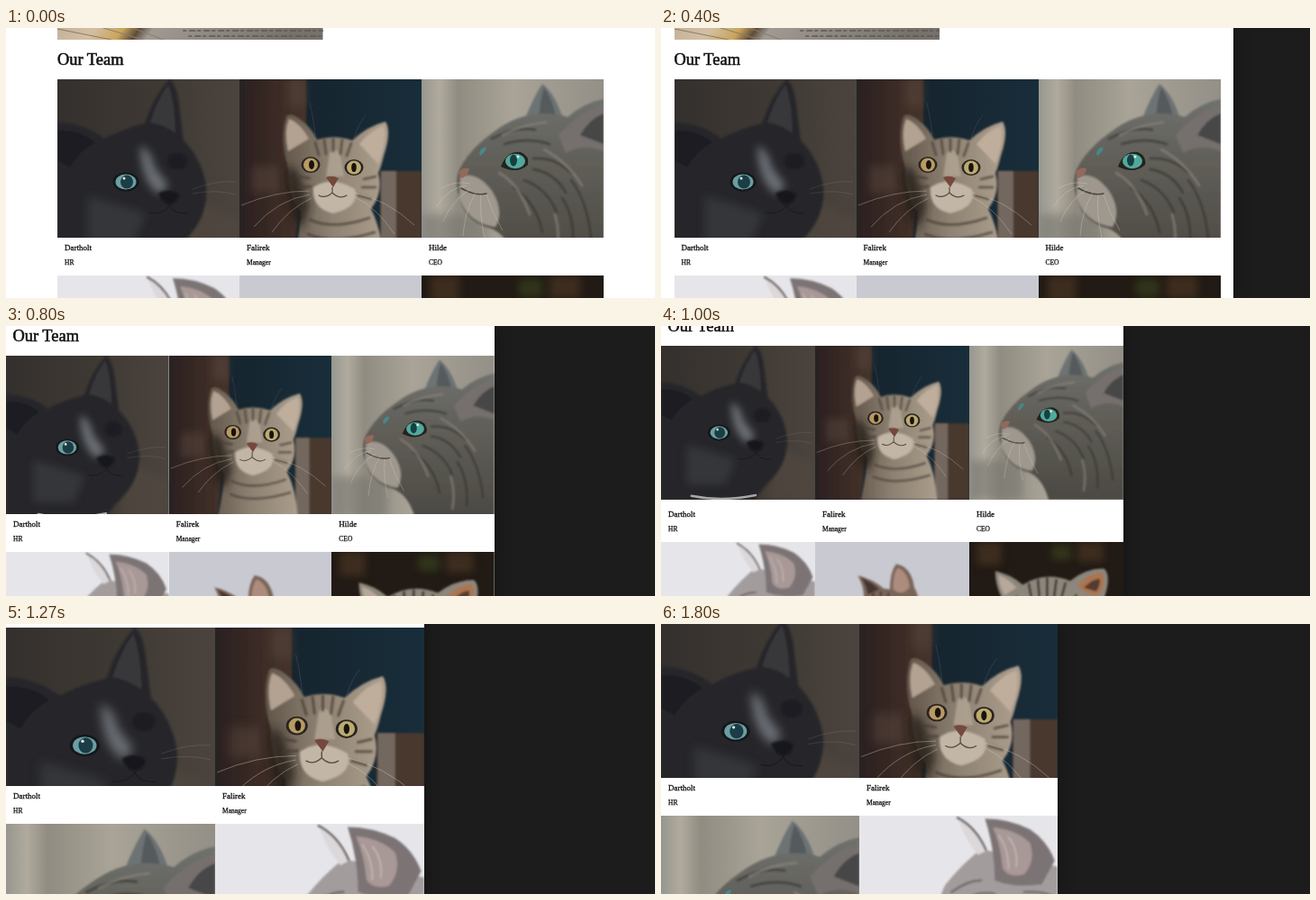
An HTML page that plays this animation: 720x300 px, repeating every 1870 ms.

```html
<!DOCTYPE html>
<html lang="en">
<head>
<meta charset="utf-8">
<title>Our Team</title>
<style>
html, body { margin: 0; width: 100%; height: 100%; overflow: hidden; background: #1c1c1c; }
.window {
  position: absolute; left: 0; top: 0; width: 720px; height: 300px;
  background: #fff; overflow: hidden; container-type: inline-size;
  box-shadow: 0 0 16px rgba(0, 0, 0, .35);
  font-family: "Liberation Serif", Times, serif; color: #111;
  animation: resize 1870ms step-end infinite;
}
/* The window edge is dragged left in three pulls. */
@keyframes resize {
  0% { width: 720px } 3.74% { width: 696px }
  14.43% { width: 677px } 17.64% { width: 655px } 21.39% { width: 635px }
  25.13% { width: 622px } 28.34% { width: 611px } 32.08% { width: 601px }
  35.82% { width: 592px } 39.03% { width: 571px }
  42.78% { width: 542px } 46.52% { width: 528px } 53.47% { width: 513px }
  57.21% { width: 505px } 60.42% { width: 497px } 64.17% { width: 480px }
  67.91% { width: 464px }
  78.60% { width: 459px } 81.81% { width: 454px } 85.56% { width: 450px }
  89.30% { width: 446px } 92.51% { width: 443px } 96.25%, 100% { width: 440px }
}
main {
  position: relative; max-width: 606px; margin: 0 auto;
  top: calc(56.9px - .37 * max(0px, 606px - 100cqw));
}
.banner {
  position: absolute; left: 0; bottom: calc(100% + 44px); width: 48.6%; height: 60px;
}
h1 {
  position: absolute; margin: 0; top: -34px; left: 0; line-height: 24px;
  font-size: 18.4px; font-weight: 400; -webkit-text-stroke: .55px; white-space: nowrap;
}
.team { display: grid; grid-template-columns: repeat(3, 1fr); }
@container (max-width: 605px) { h1 { left: 7.5px; } }
@container (max-width: 484px) { .team { grid-template-columns: repeat(2, 1fr); } }
.card { position: relative; height: 218px; min-width: 0; }
.photo { width: 100%; aspect-ratio: 1; max-height: 176px; overflow: hidden; }
.photo svg { display: block; width: 100%; height: auto; }
.card p { position: absolute; margin: 0; left: 8px; line-height: 12px; white-space: nowrap; }
.name { top: 181px; font-size: 9px; -webkit-text-stroke: .3px; }
.role { top: 198px; font-size: 7.5px; -webkit-text-stroke: .25px; }
.line { fill: none; stroke-linecap: round; }
.whiskers { fill: none; stroke: #d8d0c6; stroke-width: .6; opacity: .6; }
.whiskers.faint { opacity: .2; }
</style>
</head>
<body>
<svg width="0" height="0" style="position:absolute">
  <defs>
    <filter id="soft" x="-30%" y="-30%" width="160%" height="160%"><feGaussianBlur stdDeviation="5"/></filter>
    <filter id="fur" x="-10%" y="-10%" width="120%" height="120%"><feGaussianBlur stdDeviation="1"/></filter>
    <linearGradient id="dusk"><stop stop-color="#34302d"/><stop offset=".55" stop-color="#3f3934"/><stop offset="1" stop-color="#4b443e"/></linearGradient>
    <linearGradient id="shelf"><stop stop-color="#2a2020"/><stop offset=".6" stop-color="#3c2c26"/><stop offset="1" stop-color="#46342c"/></linearGradient>
    <linearGradient id="navy"><stop stop-color="#152029"/><stop offset="1" stop-color="#182d3a"/></linearGradient>
    <linearGradient id="curtain"><stop stop-color="#97978f"/><stop offset=".1" stop-color="#b0aa9e"/><stop offset=".2" stop-color="#918c81"/><stop offset=".5" stop-color="#a9a497"/><stop offset="1" stop-color="#948f87"/></linearGradient>
    <linearGradient id="tabby"><stop stop-color="#615549"/><stop offset=".45" stop-color="#8d8172"/><stop offset="1" stop-color="#aea08e"/></linearGradient>
    <linearGradient id="slate" x2="0" y2="1"><stop stop-color="#6f716d"/><stop offset=".4" stop-color="#605e58"/><stop offset="1" stop-color="#4c4943"/></linearGradient>
    <linearGradient id="wood" x2="1" y2=".15"><stop stop-color="#b9a78f"/><stop offset=".25" stop-color="#d2bfa4"/><stop offset=".36" stop-color="#c9a45c"/><stop offset=".42" stop-color="#5c4c3c"/><stop offset=".47" stop-color="#a09a93"/><stop offset="1" stop-color="#77716c"/></linearGradient>
  </defs>
</svg>

<div class="window">
<main>
  <svg class="banner" viewBox="0 0 295 60" preserveAspectRatio="none">
    <rect width="295" height="60" fill="url(#wood)"/>
    <path class="line" d="M0 48 60 60M28 40 95 60M70 42 118 60" stroke="#8e7c66"/>
    <path class="line" d="M140 50H295M146 56H295" stroke="#5d5853" stroke-width="1.5" stroke-dasharray="3 4 6 3"/>
  </svg>
  <h1>Our Team</h1>
  <div class="team">

    <div class="card">
      <div class="photo"><svg viewBox="0 0 202 202">
        <rect width="202" height="202" fill="url(#dusk)"/>
        <path d="M150 130 202 158V202H140Z" fill="#554b43" opacity=".5" filter="url(#soft)"/>
        <g filter="url(#fur)">
          <path d="M0 48Q28 48 52 66Q72 55 97 49Q106 20 124 0Q133 5 136 36L140 68Q160 88 165 118Q168 150 146 174Q130 190 124 202H0Z" fill="#25272a"/>
          <path d="M103 48Q111 22 123 6Q130 24 131 60Q118 50 103 48Z" fill="#38383b"/>
          <path d="M0 57Q24 55 42 70Q24 80 14 98L0 90Z" fill="#1d1f21"/>
        </g>
        <path d="M92 74Q104 78 108 98L122 116Q120 128 110 126Q92 110 92 74Z" fill="#82878e" opacity=".75" filter="url(#soft)"/>
        <path d="M34 130Q66 138 98 150L84 182H34Z" fill="#43464a" opacity=".5" filter="url(#soft)"/>
        <path d="M112 127Q124 120 135 128Q133 138 124 139Q116 137 112 127Z" fill="#17181a" filter="url(#fur)"/>
        <path class="line" d="M124 139Q128 150 144 149M124 141Q114 152 102 148" stroke="#191a1c"/>
        <ellipse cx="133" cy="91" rx="11" ry="9" fill="#1b1d20" filter="url(#fur)"/>
        <ellipse cx="76" cy="114" rx="14.5" ry="10.5" fill="#15171a"/>
        <ellipse cx="76" cy="114" rx="11.5" ry="8.5" fill="#6b9fa2"/>
        <ellipse cx="77" cy="114" rx="7" ry="7.5" fill="#1c3d45"/>
        <circle cx="74" cy="110" r="1.5" fill="#dcebed"/>
        <path class="whiskers faint" d="M150 122Q176 112 198 114M150 127Q178 122 198 128"/>
        <path class="line" d="M40 197Q80 205 124 196" stroke="#a8a8a8" stroke-width="3"/>
      </svg></div>
      <p class="name">Dartholt</p><p class="role">HR</p>
    </div>

    <div class="card">
      <div class="photo"><svg viewBox="0 0 202 202">
        <rect width="202" height="202" fill="url(#navy)"/>
        <path d="M0 0H74V66L60 202H0Z" fill="url(#shelf)" filter="url(#fur)"/>
        <path d="M54 0H74V30H54ZM14 96H46V126H14Z" fill="#59463c" opacity=".5" filter="url(#soft)"/>
        <path d="M156 102H202V202H156Z" fill="#48382f" filter="url(#fur)"/>
        <path d="M157 102H174V202H157Z" fill="#73675e" filter="url(#fur)"/>
        <g filter="url(#fur)">
          <path d="M54 98Q44 66 52 41Q56 36 68 45Q80 54 86 67Q106 61 125 68Q142 52 162 47Q169 58 160 85Q157 98 154 104Q160 126 146 144Q158 168 160 202H60Q68 164 68 148Q53 126 54 98Z" fill="url(#tabby)"/>
          <path d="M54 80Q49 58 55 44Q67 48 77 66Z" fill="#b3a191"/>
          <path d="M154 94Q164 68 160 52Q146 56 133 72Z" fill="#c0ae9d"/>
        </g>
        <path d="M50 100Q62 92 68 112L78 140 70 166 56 150Z" fill="#211b18" opacity=".8" filter="url(#soft)"/>
        <path d="M100 82Q106 74 112 84L116 108H96Z" fill="#b7aa99" opacity=".7" filter="url(#fur)"/>
        <g filter="url(#fur)">
          <path d="M82 120Q102 106 128 122Q134 142 104 149Q80 144 82 120Z" fill="#c2b6a7"/>
          <path class="line" d="M84 70 88 84M94 67 96 83M104 66V80M114 67 112 83M124 71 119 85M66 108 78 110M66 120 80 119M151 108 138 111M151 120 136 120M146 133 132 129M78 156Q104 168 144 154M76 172Q104 184 150 170" stroke="#443b34" stroke-width="2.6" opacity=".7"/>
        </g>
        <ellipse cx="79" cy="95" rx="10.5" ry="9" fill="#2a2420"/>
        <ellipse cx="127" cy="98" rx="10.5" ry="9" fill="#2a2420"/>
        <ellipse cx="79" cy="95" rx="8" ry="7.4" fill="#b89a64"/>
        <ellipse cx="127" cy="98" rx="8" ry="7.4" fill="#bcab70"/>
        <ellipse cx="80" cy="95" rx="3" ry="5" fill="#17130f"/>
        <ellipse cx="127" cy="98" rx="2.8" ry="5" fill="#17130f"/>
        <path d="M96 109Q103 106 110 110L104 120Z" fill="#75483c"/>
        <path class="line" d="M103 120V126Q95 133 88 129M103 126Q111 134 119 129" stroke="#5a4a41" stroke-width="1.2"/>
        <path class="whiskers" d="M78 124Q40 124 2 140M78 128Q42 134 16 164M80 132Q54 144 36 170M128 126Q164 134 194 162M128 131Q152 142 172 172"/>
        <path class="whiskers faint" d="M84 62Q82 42 78 26M127 65Q132 50 140 40"/>
      </svg></div>
      <p class="name">Falirek</p><p class="role">Manager</p>
    </div>

    <div class="card">
      <div class="photo"><svg viewBox="0 0 202 202">
        <rect width="202" height="202" fill="url(#curtain)"/>
        <path d="M0 150H70V202H0Z" fill="#777670" opacity=".6" filter="url(#soft)"/>
        <g filter="url(#fur)">
          <path d="M114 46Q124 20 134 5Q150 18 158 48Z" fill="#6d7273"/>
          <path d="M130 44Q132 20 136 9Q146 24 150 46Z" fill="#545a5d"/>
          <path d="M42 100Q54 76 82 57Q106 39 134 38Q152 38 162 42Q180 26 202 22V202H104Q96 174 78 166Q48 158 42 132Q36 114 42 100Z" fill="url(#slate)"/>
          <path d="M152 62Q174 36 202 29V80Q180 70 160 82Z" fill="#75706d"/>
          <path d="M176 62Q186 44 202 38V72Z" fill="#474647"/>
          <path d="M43 108Q62 102 78 124Q92 146 82 164Q52 160 42 132Z" fill="#9f988e"/>
          <path class="line" d="M78 66Q104 52 126 56M92 72Q118 64 142 72M124 88Q148 86 166 104M124 100Q148 104 160 126M114 112Q140 122 150 148M102 120Q128 138 134 170M166 112Q184 136 188 176M156 132Q170 152 168 186" stroke="#33312e" stroke-width="2.8" opacity=".6"/>
          <path class="line" d="M86 104Q108 116 120 150M136 78Q162 92 178 118M148 150Q154 170 150 190M90 62Q112 50 138 48" stroke="#8a867c" stroke-width="2.6" opacity=".65"/>
        </g>
        <path d="M64 82Q67 74 72 76Q70 82 65 85Z" fill="#47888a"/>
        <path d="M88 97Q95 79 110 81Q120 85 118 95Q106 106 88 97Z" fill="#24211e"/>
        <ellipse cx="104" cy="91" rx="11" ry="8.2" fill="#51a99e"/>
        <ellipse cx="102" cy="90" rx="4" ry="6.5" fill="#16403f"/>
        <circle cx="107" cy="86" r="1.5" fill="#d9f3ec"/>
        <path d="M41 104Q45 97 53 99Q52 107 44 110Z" fill="#94685a"/>
        <path class="line" d="M44 121Q60 130 72 127" stroke="#4a443e" stroke-width="1.5"/>
        <path class="whiskers" d="M50 118Q30 120 16 142M54 122Q34 134 24 158M60 126Q48 146 46 174M66 128Q64 150 70 176M72 128Q78 148 90 168M54 116Q38 112 22 121"/>
      </svg></div>
      <p class="name">Hilde</p><p class="role">CEO</p>
    </div>

    <div class="card">
      <div class="photo"><svg viewBox="0 0 202 202">
        <rect width="202" height="202" fill="#e6e6ea"/>
        <g filter="url(#fur)">
          <path d="M124 34Q160 42 202 52V202H72Q74 92 88 70Q104 50 124 34Z" fill="#a39c9d"/>
          <path d="M100 2Q118 12 129 36L121 40Q107 24 100 2Z" fill="#dcd8da"/>
          <path class="line" d="M100 2Q119 12 129 35" stroke="#5f5250" stroke-width="2"/>
          <path d="M128 3Q152 3 174 14Q192 26 199 46L186 70Q158 74 138 66Q138 34 128 3Z" fill="#7c7375"/>
          <path d="M136 12Q160 14 174 28Q180 46 168 60Q152 64 146 54Q144 30 136 12Z" fill="#a89896"/>
          <path class="line" d="M142 20Q152 34 152 54M152 22Q162 34 160 52" stroke="#d0c6c5"/>
          <path class="line" d="M94 78Q110 66 124 66M108 86Q122 76 138 80M168 78Q186 76 202 84" stroke="#756e70" stroke-width="2.5"/>
        </g>
      </svg></div>
    </div>

    <div class="card">
      <div class="photo"><svg viewBox="0 0 202 202">
        <rect width="202" height="202" fill="#c9cad1"/>
        <g filter="url(#fur)">
          <path d="M56 44Q74 48 90 61L98 62Q98 40 106 29Q126 32 130 60Q145 84 142 202H54Q54 100 64 71Q63 56 56 44Z" fill="#796558"/>
          <path d="M60 47Q74 52 84 62L69 69Q67 56 60 47Z" fill="#423430"/>
          <path d="M102 62Q102 42 108 34Q121 38 124 59Q114 72 102 62Z" fill="#ad8b7d"/>
          <path class="line" d="M76 68V84M86 66V84M96 68 94 84" stroke="#453832" stroke-width="2.5"/>
        </g>
      </svg></div>
    </div>

    <div class="card">
      <div class="photo"><svg viewBox="0 0 202 202">
        <rect width="202" height="202" fill="#211a15"/>
        <path d="M10 0H42V30H10ZM142 0H176V26H142Z" fill="#4a3420" opacity=".7" filter="url(#soft)"/>
        <path d="M108 4H134V24H108Z" fill="#37401f" opacity=".7" filter="url(#soft)"/>
        <g filter="url(#fur)">
          <path d="M34 38Q54 42 70 56Q100 38 132 51Q154 34 177 35Q186 44 178 70Q172 88 170 202H50Q46 90 42 72Q34 56 34 38Z" fill="#8d867b"/>
          <path d="M38 43Q52 48 62 60L46 70Q39 56 38 43Z" fill="#b8a89a"/>
          <path d="M142 56Q158 41 174 40Q180 50 172 67Q157 76 142 56Z" fill="#ac7550"/>
          <path d="M150 60Q162 48 171 48Q172 58 166 65Z" fill="#553b30"/>
          <path class="line" d="M78 55 82 76M90 50 92 74M102 48V74M114 50 111 74M126 54 120 76M62 72 72 82M140 70 132 82" stroke="#37312c" stroke-width="3"/>
        </g>
      </svg></div>
    </div>

  </div>
</main>
</div>
</body>
</html>
```
